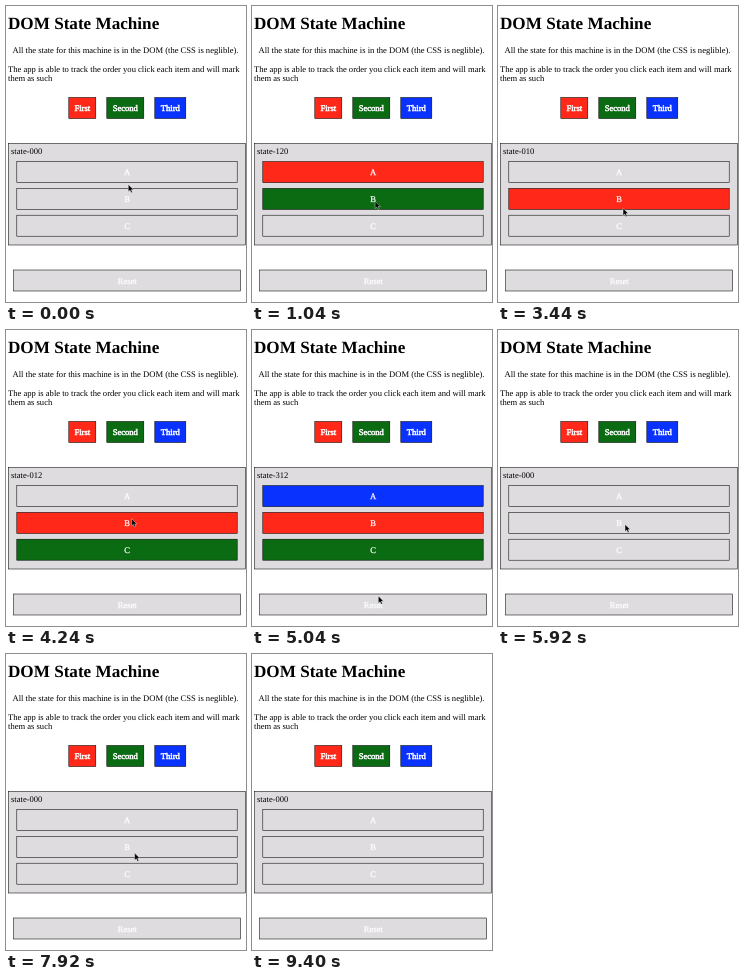
An HTML page for the animation above (9.48 s loop, 240 by 296 pixels).

```html
<!DOCTYPE html>
<html lang="en">
<head>
<meta charset="utf-8">
<title>DOM State Machine</title>
<style>
  html, body { margin: 0; width: 100%; height: 100%; overflow: hidden; background: #fff; }
  svg { display: block; width: 240px; height: 296px; }
  text { font: 8.57px "Liberation Serif", "Times New Roman", serif; text-rendering: geometricPrecision; }
  rect { fill: #dedcdf; stroke: #000; stroke-width: .54; }
  .title { font-size: 17.14px; font-weight: bold; }
  .label { fill: #fff; stroke: #fff; stroke-width: .25; text-anchor: middle; }
  .legend { stroke-width: .5; }
</style>
</head>
<body>
<svg id="stage" viewBox="0 0 240 296">
  <text class="title" x="2" y="23.3">DOM State Machine</text>
  <text x="6.5" y="47">All the state for this machine is in the DOM (the CSS is neglible).</text>
  <text x="2" y="65.5">The app is able to track the order you click each item and will mark</text>
  <text x="2" y="74.8">them as such</text>
  <rect x="2.4" y="137.5" width="237" height="101.5"/>
  <text id="state" x="5" y="148.3"></text>
</svg>
<script>
const LOOP = 9480, STEP = 40, REST = 120;
const COLORS = ['#dedcdf', '#ff2819', '#0a6b13', '#0a32ff'];
const ITEMS = ['A', 'B', 'C'];
const stage = document.getElementById('stage');
const stateText = document.getElementById('state');

function add(tag, attributes, text = '') {
  const node = document.createElementNS('http://www.w3.org/2000/svg', tag);
  for (const [name, value] of Object.entries(attributes)) node.setAttribute(name, value);
  node.textContent = text;
  return stage.appendChild(node);
}

function button(label, x, y, width, color = 0) {
  const box = add('rect', { x, y, width, height: 21 });
  box.style.fill = COLORS[color];
  const style = color ? 'label legend' : 'label';
  add('text', { class: style, x: x + width / 2, y: y + 13.5 }, label);
  return box;
}

const itemTop = i => 155.6 + i * 26.8;

button('First', 62.8, 91.5, 27, 1);
button('Second', 100.8, 91.5, 37, 2);
button('Third', 148.8, 91.5, 31, 3);
const boxes = ITEMS.map((label, i) => button(label, 10.8, itemTop(i), 220.4));
button('Reset', 7.7, 264, 227);

const cursor = add('path', {
  d: 'M0 0V7.2L1.7 5.7L2.9 8.3L4.1 7.7L3 5.2H5.2Z',
  fill: '#000', stroke: '#fff', 'stroke-width': .4
});

// Pointer stops; each stop on an item or on Reset is a click.
const stops = [
  [-REST, 'start'],
  [360, 'A'], [880, 'B'], [1480, 'C'],
  [2360, 'C'], [2960, 'A'], [3800, 'C'], [4600, 'A'], [5220, 'Reset'],
  [6040, 'B'], [6640, 'C'], [7520, 'Reset'],
  [8600, 'exit'], [LOOP + REST, 'exit']
];
const targetY = { start: 178.5, Reset: 273, exit: -12 };
ITEMS.forEach((name, i) => targetY[name] = itemTop(i) + 12);

// A click appends an item to the order, or removes it if already there.
function stateAt(time) {
  let order = [];
  for (const [clickTime, name] of stops) {
    if (clickTime > time) break;
    if (name === 'Reset') order = [];
    else if (order.includes(name)) order = order.filter(item => item !== name);
    else if (ITEMS.includes(name)) order.push(name);
  }
  return ITEMS.map(name => order.indexOf(name) + 1);
}

// The pointer rests around every click and eases between them.
function pointerAt(time) {
  const next = stops.findIndex(stop => stop[0] > time);
  const [t0, from] = stops[next - 1], [t1, to] = stops[next];
  const p = Math.min(1, Math.max(0, (time - t0 - REST) / (t1 - t0 - 2 * REST)));
  const y = targetY[from] + (targetY[to] - targetY[from]) * p * p * (3 - 2 * p);
  return [122.3 + time * 0.0008, y];
}

function draw(now) {
  const time = Math.floor((now % LOOP) / STEP) * STEP;
  const state = stateAt(time);
  stateText.textContent = 'state-' + state.join('');
  boxes.forEach((box, i) => box.style.fill = COLORS[state[i]]);
  cursor.setAttribute('transform', `translate(${pointerAt(time)})`);
}

let start;
function frame(now) {
  start ??= now;
  draw(Math.max(0, now - start));
  requestAnimationFrame(frame);
}
draw(0);
requestAnimationFrame(frame);
</script>
</body>
</html>
```
